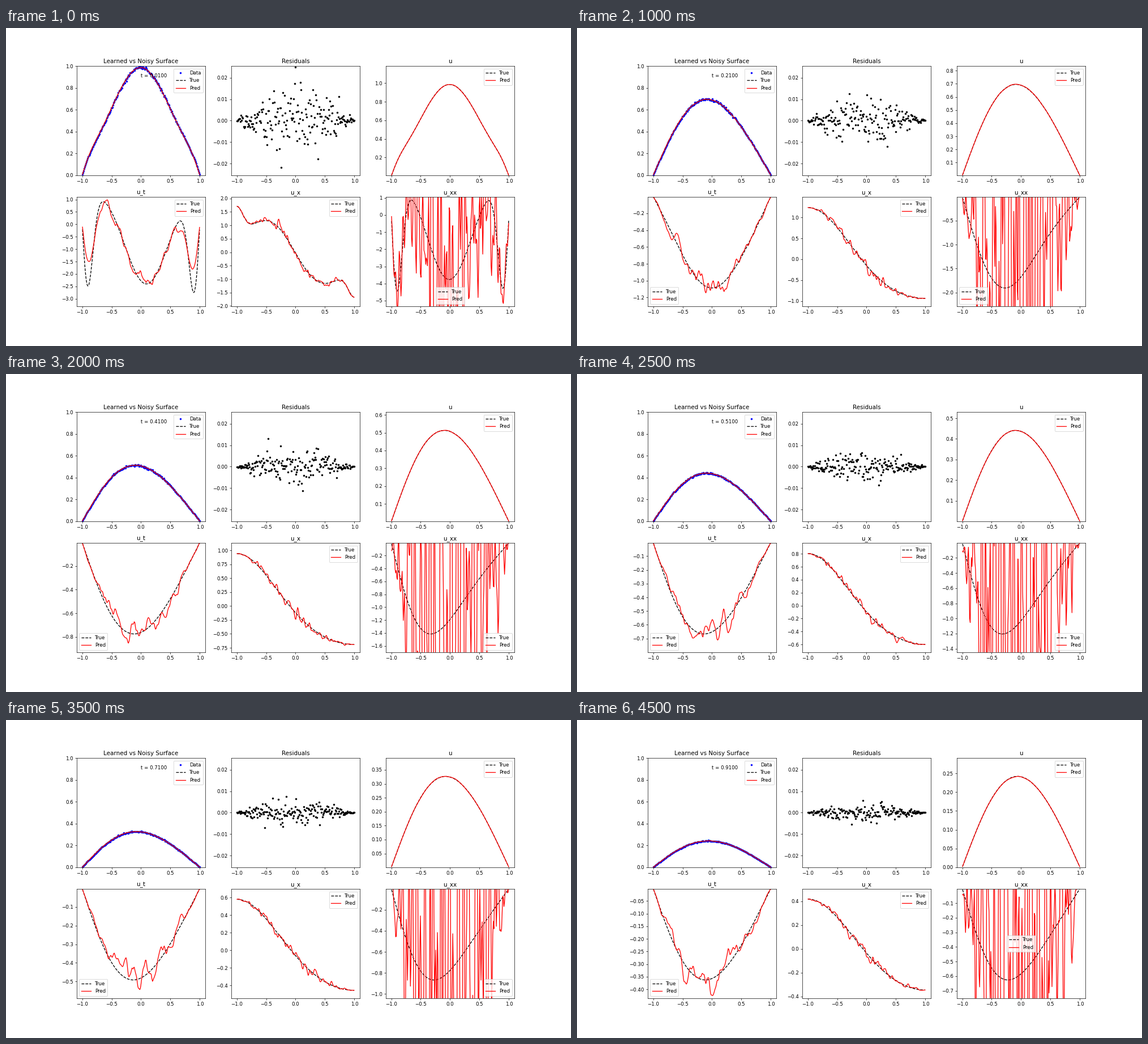
A matplotlib script that plays this animation: 998x561 px, repeating every 5 s.

```python
import numpy as np
import matplotlib.pyplot as plt
from matplotlib.animation import FuncAnimation

W, H, DPI = 998, 561, 62.375
FRAMES = 10
NU, DRIFT = 0.6, 0.8
DX, DT = 0.005, 1.6e-5
LAG = 0.01  # first time shown, and step of the time-derivative estimate

plt.rcParams["font.family"] = "DejaVu Sans"

grid = np.linspace(-1, 1, 401)
x = grid[1:-1:2]


def derivatives(u):
    """u_t, u_x and u_xx at the inner nodes of u_t = NU u_xx + DRIFT u u_x."""
    ux = (u[2:] - u[:-2]) / (2 * DX)
    uxx = (u[2:] - 2 * u[1:-1] + u[:-2]) / DX ** 2
    return NU * uxx + DRIFT * u[1:-1] * ux, ux, uxx


def advance(u, span):
    u = u.copy()
    for _ in range(round(span / DT)):
        u[1:-1] += DT * derivatives(u)[0]
    return u


def smooth_noise(rng, width):
    """Unit-variance noise with a Gaussian correlation, in samples."""
    r = np.arange(-15, 16)
    kernel = np.exp(-r ** 2 / (2 * width ** 2))
    kernel /= np.sqrt((kernel ** 2).sum())
    return np.convolve(rng.normal(size=x.size + 30), kernel, "valid")


def estimate(rng, true, lagged):
    """Noisy estimates of u, u_t, u_x, u_xx, all quiet near the ends."""
    u, ut, ux, uxx = true
    rate = (lagged - u) / LAG
    swing = 0.08 * smooth_noise(rng, 3.5) + 0.03 * smooth_noise(rng, 1.2)
    wiggle = 0.1 * u * smooth_noise(rng, 1.3)
    return (u + 0.0018 * u * smooth_noise(rng, 4),
            rate + np.abs(rate).max() * u / u.max() * swing,
            ux + wiggle,
            uxx + np.gradient(wiggle, x))


def build():
    rng = np.random.default_rng(12)
    u = 1.01 * np.exp(-2 * grid ** 2)
    u[0] = u[-1] = 0
    u = advance(u, LAG)
    scenes = []
    for _ in range(FRAMES):
        later = advance(u, LAG)
        true = [a[::2] for a in (u[1:-1], *derivatives(u))]
        pred = estimate(rng, true, later[1:-1:2])
        resid = 0.0088 * true[0] * rng.normal(size=x.size)
        scenes.append((true, pred, resid))
        u = advance(later, 0.1 - LAG)
    return scenes


scenes = build()

fig, axes = plt.subplots(2, 3, figsize=(W / DPI, (H + 1e-6) / DPI), dpi=DPI)
fig.subplots_adjust(left=0.125, right=0.9, bottom=0.125, top=0.88,
                    wspace=0.2, hspace=0.2)

# Where the legend sits over the crowded u_xx panel, if not lower right
XX_LEGEND = {0: "lower center", 2: "lower left", 3: "lower left", 9: "center"}


def lines(ax, true, pred):
    ax.plot(x, true, "k--", label="True")
    ax.plot(x, pred, "r", label="Pred")


def compare(ax, title, true, pred, loc="best", pad=0):
    lines(ax, true, pred)
    ax.set_ylim(1.2 * true.min() - pad, 1.2 * true.max())
    ax.set_title(title)
    ax.legend(loc=loc)


def draw(k):
    for ax in axes.flat:
        ax.clear()
    true, pred, resid = scenes[k]
    surface, scatter, *panels = axes.flat

    surface.plot(x, pred[0] + resid, "b.", label="Data")
    lines(surface, true[0], pred[0])
    surface.set_ylim(0, 1)
    surface.set_title("Learned vs Noisy Surface")
    surface.text(0.5, 0.9, f"t = {0.01 + 0.1 * k:.4f}",
                 transform=surface.transAxes)
    surface.legend(loc="upper right")

    scatter.plot(x, resid, "k.")
    scatter.set_ylim(-0.0255, 0.0254)
    scatter.set_title("Residuals")

    compare(panels[0], "u", true[0], pred[0], pad=0.0022)
    compare(panels[1], "u_t", true[1], pred[1])
    compare(panels[2], "u_x", true[2], pred[2])
    compare(panels[3], "u_xx", true[3], pred[3],
            XX_LEGEND.get(k, "lower right"))
    return []


anim = FuncAnimation(fig, draw, frames=FRAMES, interval=500,
                     init_func=lambda: draw(0), repeat=True, repeat_delay=0)
plt.show()
```
